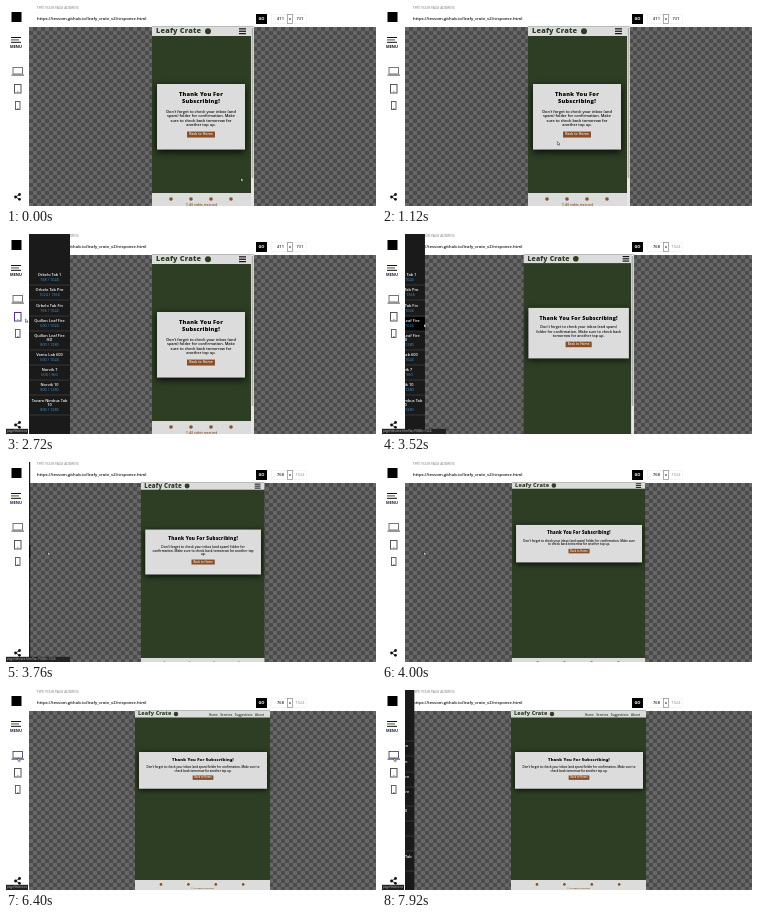
Write an HTML page with a canvas that moves like this. It is 370x200 px and loops after 8 s.

```html
<!DOCTYPE html>
<html lang="en">
<head>
<meta charset="utf-8">
<title>Responsive preview</title>
<style>
html, body { margin: 0; width: 100%; height: 100%; overflow: hidden; background: #fff; }
canvas { display: block; width: 370px; height: 200px; }
</style>
</head>
<body>
<canvas id="stage" width="370" height="200"></canvas>
<script>
const ctx = document.getElementById('stage').getContext('2d');
const LOOP = 8000, STEP = 80;
const SANS = '"Open Sans", "Noto Sans", sans-serif';
const GREEN = '#2d3e24', PAPER = '#dcdcdc', BROWN = '#87502b', INK = '#111';

const DEVICES = [
  [41, 'Orbelo Tab 1', '768 / 1024'], [56, 'Orbelo Tab Pro', '1024 / 1366'],
  [72, 'Orbelo Tab Fin', '768 / 1024'], [87, 'Quillon Leaf Fire', '600 / 1024'],
  [102, 'Quillon Leaf Fire|HD', '800 / 1280'], [121, 'Vantu Lab 600', '600 / 1024'],
  [136, 'Norvik 7', '600 / 960'], [151, 'Norvik 10', '800 / 1280'],
  [167, 'Tavaro Nimbus Tab|10', '800 / 1280']
];
const MESSAGE = "Don't forget to check your inbox (and spam) folder for confirmation. " +
  'Make sure to check back tomorrow for another top up.';

// time, x, y of the pointer
const POINTER = [
  [0, 235, 172], [80, 235, 172], [320, 195, 132], [640, 196, 134], [960, 190, 140],
  [1760, 12, 86], [2640, 13, 86], [2800, 26, 84], [3440, 42, 90], [4560, 42, 90],
  [4960, 209, 192], [5360, 21, 76], [5520, 20, 75], [6160, 12, 68], [8000, 12, 68]
];

const clamp = v => Math.max(0, Math.min(1, v));
const mix = (a, b, k) => a + (b - a) * k;

function bezier(x1, y1, x2, y2) {
  const at = (a, b, u) => 3 * a * u * (1 - u) ** 2 + 3 * b * u * u * (1 - u) + u ** 3;
  return x => {
    let lo = 0, hi = 1;
    for (let i = 0; i < 24; i++) {
      const mid = (lo + hi) / 2;
      if (at(x1, x2, mid) < x) lo = mid; else hi = mid;
    }
    return at(y1, y2, (lo + hi) / 2);
  };
}
const ease = bezier(0.25, 0.1, 0.25, 1);
const easeInOut = bezier(0.42, 0, 0.58, 1);
const ramp = (t, start, length, curve) => curve(clamp((t - start) / length));

function box(x, y, w, h, color) {
  ctx.fillStyle = color;
  ctx.fillRect(x, y, w, h);
}

function frame(x, y, w, h, color, line = 0.8) {
  ctx.strokeStyle = color;
  ctx.lineWidth = line;
  ctx.strokeRect(x, y, w, h);
}

function dot(x, y, r, color) {
  ctx.fillStyle = color;
  ctx.beginPath();
  ctx.arc(x, y, r, 0, 7);
  ctx.fill();
}

function setFont(size, weight, spacing = 0) {
  ctx.font = `${weight} ${size}px ${SANS}`;
  ctx.letterSpacing = spacing + 'px';
}

function label(str, x, y, size, color, weight = 700, align = 'left', spacing = 0) {
  setFont(size, weight, spacing);
  ctx.textAlign = align;
  ctx.textBaseline = 'middle';
  ctx.fillStyle = color;
  ctx.fillText(str, x, y);
}

function wrap(str, width) {
  const lines = [];
  let line = '';
  for (const word of str.split(' ')) {
    const next = line ? line + ' ' + word : word;
    if (line && ctx.measureText(next).width > width) {
      lines.push(line);
      line = word;
    } else line = next;
  }
  return [...lines, line];
}

function checker() {
  box(23, 21, 347, 179, '#4c4c4c');
  for (let row = 0; row < 45; row++)
    for (let col = row % 2; col < 87; col += 2)
      box(23 + col * 4, 21 + row * 4, 4, 4, '#676767');
}

function topBar(t) {
  box(0, 0, 370, 21, '#fff');
  label('TYPE YOUR PAGE ADDRESS', 30.5, 2.2, 3.4, '#777', 400);
  label('https://tessom.github.io/leafy_crate_v2/response.html', 31, 12.8, 4.2, INK, 600);
  box(250, 8, 11, 10, '#000');
  label('GO', 255.5, 13, 4, '#fff', 700, 'center');
  const tablet = t >= 3280;
  frame(265.5, 8.5, 35, 9, '#eee', 0.6);
  label(tablet ? '768' : '411', 274.5, 13, 4, '#222', 600, 'center');
  frame(281.5, 8.5, 5, 9, '#999', 0.8);
  label('x', 284, 12.8, 4.2, '#222', 600, 'center');
  label(tablet ? '1024' : '731', 294, 13, 4, tablet ? '#aaa' : '#333', 600, 'center');
}

function card(p, s) {
  const left = 151 - 18 * p, right = 239 + 22 * p ** 0.75, top = 78 - 16 * p;
  const mid = (left + right) / 2, inner = right - left - 16 * s;
  const titleSize = 5.6 * s, bodySize = 3.9 * s;
  setFont(titleSize, 800, 0.25 * s);
  const title = wrap('Thank You For Subscribing!', inner + 5);
  setFont(bodySize, 600);
  const body = wrap(MESSAGE, inner + 1);
  const titleY = top + 11 * s;
  const bodyY = titleY + ((title.length - 1) * 7 + 10) * s;
  const buttonY = bodyY + ((body.length - 1) * 4.45 + 6.2) * s;
  const bottom = buttonY + 18 * s;

  ctx.save();
  ctx.shadowColor = 'rgba(0,0,0,.85)';
  ctx.shadowBlur = 7 * s;
  ctx.shadowOffsetY = 2 * s;
  box(left, top, right - left, bottom - top, PAPER);
  ctx.restore();
  title.forEach((l, i) => label(l, mid, titleY + i * 7 * s, titleSize, '#000', 800, 'center', 0.25 * s));
  body.forEach((l, i) => label(l, mid, bodyY + i * 4.45 * s, bodySize, INK, 600, 'center'));
  box(mid - 14 * s, buttonY, 28 * s, 6 * s, BROWN);
  label('Back to Home', mid, buttonY + 3 * s, 3.5 * s, '#f0e6dc', 600, 'center');
}

function footer(y, left, right, s, p) {
  box(left, y, right - left, 200 - y, PAPER);
  const first = mix(165, 155, p), gap = mix(20, 27.4, p);
  for (let i = 0; i < 4; i++) dot(first + i * gap, y + 6 * s, 1.8 * s, BROWN);
  label('© All rights reserved', (left + right) / 2, y + 12 * s, 3.2 * s, BROWN, 600, 'center');
}

function page(t) {
  const p = ramp(t, 3170, 1000, easeInOut);
  const s = 1 - 0.26 * p, settled = t >= 4480;
  const left = 146 - 17 * p, right = 248 + 16 * p;
  const bar = p < 0.6 ? 3 : 0, edge = right - bar;
  const headH = settled ? 7 : 9.5 - 3.5 * p;
  box(left, 20.5, right - left, 179.5, GREEN);
  card(p, s);
  box(left, 20.5, edge - left, headH, PAPER);
  const midY = 20.5 + headH / 2;
  label('Leafy Crate', 150 - 18 * p, midY, 7.3 * s, GREEN, 800, 'left', 0.2 * s);
  dot(202 - 32 * p, midY, 3 * s, GREEN);
  if (settled) {
    label('Home   Services   Suggestions   About', 258, 24.8, 3.1, GREEN, 600, 'right');
  } else {
    const x = 240 + 20 * p ** 0.75;
    for (let i = -1; i < 2; i++) box(x - 7 * s, midY + i * 2.4 * s - 0.6 * s, 7 * s, 1.2 * s, INK);
  }
  const footY = settled ? 190 : p < 0.02 ? 187 : p < 0.5 ? 200 : 196;
  if (footY < 200) footer(footY, left, edge, s, p);
  if (bar) {
    box(edge, 20.5, bar, 179.5, '#e6e6e6');
    box(edge + 0.7, 22, 1.6, 150, '#b0b0b0');
  }
}

function panel(t) {
  const open = ramp(t, 2160, 480, ease) - ramp(t, 3370, 500, ease) + ramp(t, 7835, 500, ease);
  if (open <= 0.001) return;
  const shift = 41 * (open - 1);
  ctx.save();
  ctx.beginPath();
  ctx.rect(23, 0, 41, 200);
  ctx.clip();
  box(23 + shift, 0, 41, 200, '#1a1a1a');
  if (t > 3200 && t < 4000) box(23 + shift, 83, 41, 14, '#000');
  const x = 43.5 + shift;
  for (const [y, name, size] of DEVICES) {
    const lines = name.split('|');
    lines.forEach((l, i) => label(l, x, y + i * 4.2, 3.9, '#f4f4f4', 600, 'center'));
    const last = y + 5.3 + (lines.length - 1) * 4;
    label(size, x, last, 3.8, '#3c9be0', 400, 'center');
    box(23 + shift, last + 4.4, 41, 0.6, '#4a4a4a');
  }
  ctx.restore();
}

function sidebar(t) {
  box(0, 0, 23, 200, '#fff');
  box(5.5, 6, 10, 10, '#000');
  box(5, 31, 10, 1, INK);
  box(5, 33.4, 8, 1, '#3b5c36');
  box(5, 35.8, 10, 1, INK);
  label('MENU', 10, 40.7, 3.9, t >= 3280 ? '#1d1d40' : INK, 700, 'center');

  const onTablet = t >= 1760 && t < 2800, onLaptop = t >= 6160;
  const laptop = onLaptop ? '#3d3058' : '#555';
  frame(7, 61.5, 9.5, 6.5, laptop);
  box(5.5, 68.6, 12.5, 1, laptop);
  frame(8.5, 78.5, 6.5, 8.5, onTablet ? '#5b2f86' : '#555', 1);
  box(11, 85.4, 1.5, 0.8, '#777');
  frame(9.5, 95.5, 4.5, 8, '#555', 0.9);
  box(11, 102, 1.5, 0.8, '#777');

  ctx.strokeStyle = INK;
  ctx.lineWidth = 0.8;
  ctx.beginPath();
  ctx.moveTo(13.5, 188.5);
  ctx.lineTo(9.5, 191);
  ctx.lineTo(13.5, 193.3);
  ctx.stroke();
  [[13.5, 188.5], [9.5, 191], [13.5, 193.3]].forEach(([x, y]) => dot(x, y, 1.4, INK));
}

function statusBar(t) {
  const long = t >= 2800 && t < 3900;
  const short = (t >= 2240 && t < 2800) || t >= 5600;
  if (!long && !short) return;
  box(0, 194.8, long ? 64 : 22, 5.2, '#222');
  label(long ? 'page/devices.html?w=768&h=1024' : 'page/#devices', 1, 197.3, 3, '#bbb', 400);
}

function pointer(t) {
  if (t >= 480 && t < 640) return;
  const i = Math.max(1, POINTER.findIndex(k => k[0] > t));
  const [t0, x0, y0] = POINTER[i - 1], [t1, x1, y1] = POINTER[i];
  const k = easeInOut(clamp((t - t0) / (t1 - t0)));
  ctx.save();
  ctx.translate(mix(x0, x1, k), mix(y0, y1, k));
  ctx.beginPath();
  [[0, 0], [0, 3.4], [0.9, 2.7], [1.5, 3.8], [2, 3.5], [1.6, 2.4], [2.5, 2.3]]
    .forEach(([x, y]) => ctx.lineTo(x, y));
  ctx.closePath();
  ctx.fillStyle = '#fff';
  ctx.fill();
  ctx.strokeStyle = '#000';
  ctx.lineWidth = 0.4;
  ctx.stroke();
  ctx.restore();
}

function draw(now) {
  const t = Math.floor((now % LOOP) / STEP) * STEP;
  checker();
  topBar(t);
  page(t);
  panel(t);
  sidebar(t);
  statusBar(t);
  pointer(t);
}

const start = performance.now();
function tick() {
  draw(performance.now() - start);
  requestAnimationFrame(tick);
}
tick();
</script>
</body>
</html>
```
